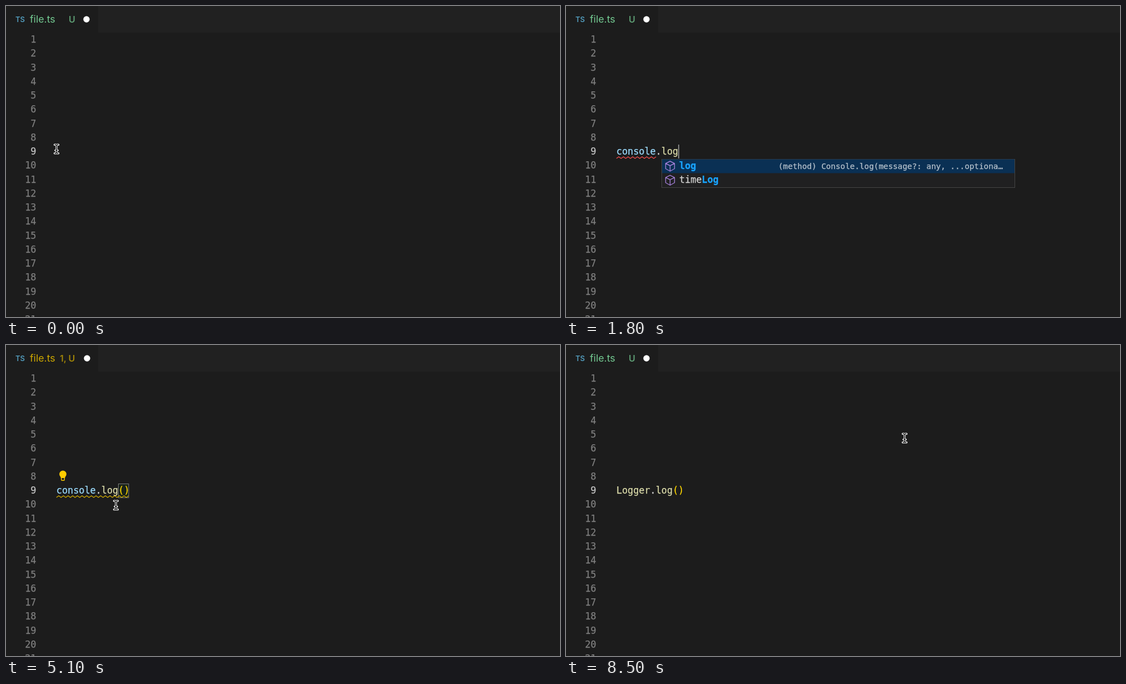
Recreate the animation shown at these times as an HTML page. Size 998 by 561 pixels, loop 8.6 s.

```html
<!DOCTYPE html>
<html lang="en">
<head>
<meta charset="utf-8">
<title>Editor warning demo</title>
<style>
  html, body { margin: 0; width: 100%; height: 100%; overflow: hidden; background: #1c1c1c; }
  svg { display: block; width: 998px; height: 561px; }
  text { white-space: pre; }
  .code { font: 16.84px "DejaVu Sans Mono", monospace; color: #d4d4d4; fill: currentColor; stroke: currentColor; stroke-width: .25; }
  .num { text-anchor: end; color: #7f7f7f; }
  .active { color: #c6c6c6; }
  .ui { font-family: Inter, sans-serif; }
  .ok { fill: #73c991; }
  .warn { fill: #cca700; }
  .dim { opacity: .75; font-size: 16px; font-weight: 600; }
  .name { font-size: 17.8px; }
  .link { font-size: 16.4px; fill: #3794ff; }
  .box { fill: #202021; stroke: #454545; }
  .first { color: #fff; }
  .detail { font-size: 14.31px; color: #fff; opacity: .7; text-anchor: end; }
  .icon, .wave { fill: none; stroke-width: 1.4; stroke-linejoin: round; }
  .icon { stroke: #a47fd8; }
  .match { color: #18a3ff; font-weight: bold; }
</style>
</head>
<body>
<svg viewBox="0 0 998 561">
  <defs>
    <path id="beam" d="M-3.5-7.8H-2Q0-7.8 0-5.8V5.8Q0 7.8-2 7.8H-3.5M3.5-7.8H2Q0-7.8 0-5.8M0 5.8Q0 7.8 2 7.8H3.5M-2 2.5H2"/>
  </defs>
  <rect width="998" height="561" fill="#1c1c1c"/>
  <rect x="166" width="832" height="48" fill="#212121"/>
  <text class="ui" x="17" y="28.5" font-size="13" font-weight="600" fill="#519aba">TS</text>
  <g id="tabOk" class="ui ok">
    <text class="name" x="43" y="30">file.ts</text>
    <text class="dim" x="113" y="29.5">U</text>
    <circle cx="145" cy="24" r="5.7" fill="#fff"/>
  </g>
  <g id="tabWarn" class="ui warn">
    <text class="name" x="43" y="30">file.ts</text>
    <text class="dim" x="97" y="29.5">1, U</text>
    <circle cx="146" cy="24" r="5.7" fill="#fff"/>
  </g>
  <g id="lines"></g>

  <rect id="hoverMark" x="90.8" y="250" width="131.8" height="25" fill="#264f78" opacity=".25"/>
  <rect id="selection" x="90.8" y="250" width="71" height="25" fill="#264f78"/>
  <rect id="brackets" x="202.5" y="250.5" width="18.5" height="25" fill="#006400" fill-opacity=".1" stroke="#7d7d7d"/>
  <text class="code" x="90.8" y="268"><tspan id="word"></tspan><tspan id="dot"></tspan><tspan id="method" color="#dcdcaa"></tspan><tspan id="parens" color="#ffd700"></tspan></text>
  <path id="waveRed" class="wave" stroke="#f14c4c"/>
  <path id="waveWarn" class="wave" stroke="#cca700"/>
  <rect id="caret" y="250" width="1.4" height="25" fill="#aeafad"/>

  <g id="bulb">
    <path d="M99.7 237.5h5.6v5.6q0 1.2-1.2 1.2h-3.2q-1.2 0-1.2-1.2z" fill="#1c1c1c" stroke="#fc0" stroke-width="1.4"/>
    <path d="M98.8 240q0-1.6-1.2-3a6.4 6.4 0 1 1 9.8 0q-1.2 1.4-1.2 3z" fill="#fc0"/>
  </g>

  <g id="list"></g>
  <g id="matches"></g>

  <g id="hover">
    <rect class="box" x="91.5" y="180" width="559" height="69.5"/>
    <path d="M92 217H650V249H92z" fill="#252526"/>
    <path d="M92 217H650" stroke="#383838"/>
    <text class="code" x="103" y="204">Prefer to use 'Logger' util. <tspan color="#858585">eslint(@codeque/warning)</tspan></text>
    <g class="ui link">
      <text x="103.5" y="240">View Problem</text>
      <text x="216.5" y="240">(⌥F8)</text>
      <text x="288.5" y="240">Quick Fix...</text>
      <text x="381.5" y="240">(⌘.)</text>
    </g>
  </g>

  <g id="mouse" fill="none">
    <use href="#beam" stroke="#fff" stroke-width="3.4" stroke-linecap="round"/>
    <use href="#beam" stroke="#111" stroke-width="1.4"/>
  </g>
</svg>
<script>
const LOOP = 8600, STEP = 100, LINE = 25.26, CHAR = 10.138, LEFT = 90.8;
const $ = id => document.getElementById(id);
const show = (id, on) => $(id).style.display = on ? '' : 'none';
const within = (t, a, b) => t >= a && t < b;

$('lines').innerHTML = Array.from({ length: 21 }, (_, i) =>
  `<text class="code num${i === 8 ? ' active' : ''}" x="54.5" y="${66 + LINE * i}">${i + 1}</text>`).join('');

function wave(chars) {
  let d = `M${LEFT} 275`;
  for (let x = 0, up = true; x + 4.2 <= chars * CHAR + 1; x += 4.2, up = !up)
    d += `l4.2 ${up ? -3 : 3}`;
  return d;
}
$('waveRed').setAttribute('d', wave(7));
$('waveWarn').setAttribute('d', wave(13));

const cube = y => `<path class="icon" d="M187.5 ${y - 9}l8 4v9.5l-8 4.5-8-4.5v-9.5zM179.5 ${y - 5}l8 4 8-4M187.5 ${y - 1}v10"/>`;
const brick = y => `<path class="icon" style="stroke:#fff" d="M189.5 ${y - 7}l7 3.5v5.5l-11 5.5-7-3.5v-5.5zM178.5 ${y - 1.5}l7 3.5 11-5.5M185.5 ${y + 2}v5.5"/>`;

// Completion popup: first row selected, detail text right-aligned.
function popup(rows, width, height, detail, icon) {
  return `<rect class="box" x="172.5" y="276.5" width="${width}" height="${height}"/>
    <rect x="173" y="276.5" width="${width - 1}" height="25" fill="#0a3054"/>` +
    rows.map((row, i) => (i ? cube : icon)(289 + LINE * i) +
      `<text class="code${i ? '' : ' first'}" x="204" y="${294 + LINE * i}">${row}</text>`).join('') +
    `<text class="code detail" x="${172.5 + width - 21.5}" y="294">${detail}</text>`;
}

$('list').innerHTML = popup(
  'Console assert clear count countReset debug dir dirxml error group groupCollapsed groupEnd'.split(' '),
  605, 300, '(property) Console.Console: console.ConsoleC…', brick) +
  '<rect x="763" y="277" width="14" height="159.5" fill="#797979" opacity=".4"/>';

const typed = (text, times, t) => text.slice(0, times.filter(k => t >= k).length);
const CONSOLE = [400, 500, 700, 800, 900, 1000, 1100];
const LOG = [1600, 1700, 1800];
const LOGGER = [5900, 6100, 6200, 6400, 6500, 6700];

// time, x, y of the pointer
const PATH = [[0, 91, 258], [400, 91, 258], [2700, 96, 262], [3200, 150, 266], [3500, 226, 268],
  [5000, 226, 268], [5100, 198, 289], [5600, 128, 264], [8200, 128, 264], [8500, 610, 168], [8600, 610, 168]];

function pointer(t) {
  const i = PATH.findIndex(p => p[0] > t);
  const [a, ax, ay] = PATH[i - 1], [b, bx, by] = PATH[i];
  const k = (t - a) / (b - a);
  return [ax + (bx - ax) * k, ay + (by - ay) * k];
}

function caretOn(t) {
  if (t < 400 || within(t, 5800, 5900)) return false;
  if (t < 2200 || within(t, 5900, 7200)) return true;
  if (t < 5800) return (t - 2200) % 1000 < 500;
  return within(t, 7600, 8100);
}

let lastQuery = '';
function showMatches(query) {
  if (query === lastQuery) return;
  lastQuery = query;
  const mark = `<tspan class="match">${query}</tspan>` + 'log'.slice(query.length);
  const time = `time<tspan class="match">${'Log'.slice(0, query.length)}</tspan>` + 'Log'.slice(query.length);
  $('matches').innerHTML = query && popup([mark, time], 636, 51, '(method) Console.log(message?: any, ...optiona…', cube);
}

function draw(t) {
  const logger = t >= 5900, called = t >= 2000;
  const word = logger ? typed('Logger', LOGGER, t) : typed('console', CONSOLE, t);
  const method = typed('log', LOG, t);
  $('word').textContent = word;
  $('word').setAttribute('color', t >= 6800 ? '#dcdcaa' : '#9cdcfe');
  $('dot').textContent = t >= 1300 ? '.' : '';
  $('method').textContent = method;
  $('parens').textContent = called ? '()' : '';

  const col = logger ? word.length
    : word.length + (t >= 1300) + method.length + called;
  $('caret').setAttribute('x', LEFT + col * CHAR);
  show('caret', caretOn(t));

  const warn = within(t, 2600, 6300);
  show('tabOk', !warn);
  show('tabWarn', warn);
  show('waveRed', within(t, 1200, 2200));
  show('waveWarn', within(t, 2600, 5900));
  show('brackets', within(t, 2000, 5700));
  show('selection', within(t, 5700, 5900));
  const hover = within(t, 3300, 5100);
  show('hover', hover);
  show('hoverMark', hover);
  show('bulb', within(t, 2600, 7400) && !hover);
  show('list', within(t, 1300, 1600));
  showMatches(within(t, 1600, 2000) ? method : '');

  show('mouse', t < 400 || within(t, 2700, 5900) || t >= 8300);
  $('mouse').setAttribute('transform', `translate(${pointer(t)})`);
}

function tick() {
  draw(Math.floor(performance.now() % LOOP / STEP) * STEP);
  requestAnimationFrame(tick);
}
tick();
</script>
</body>
</html>
```
